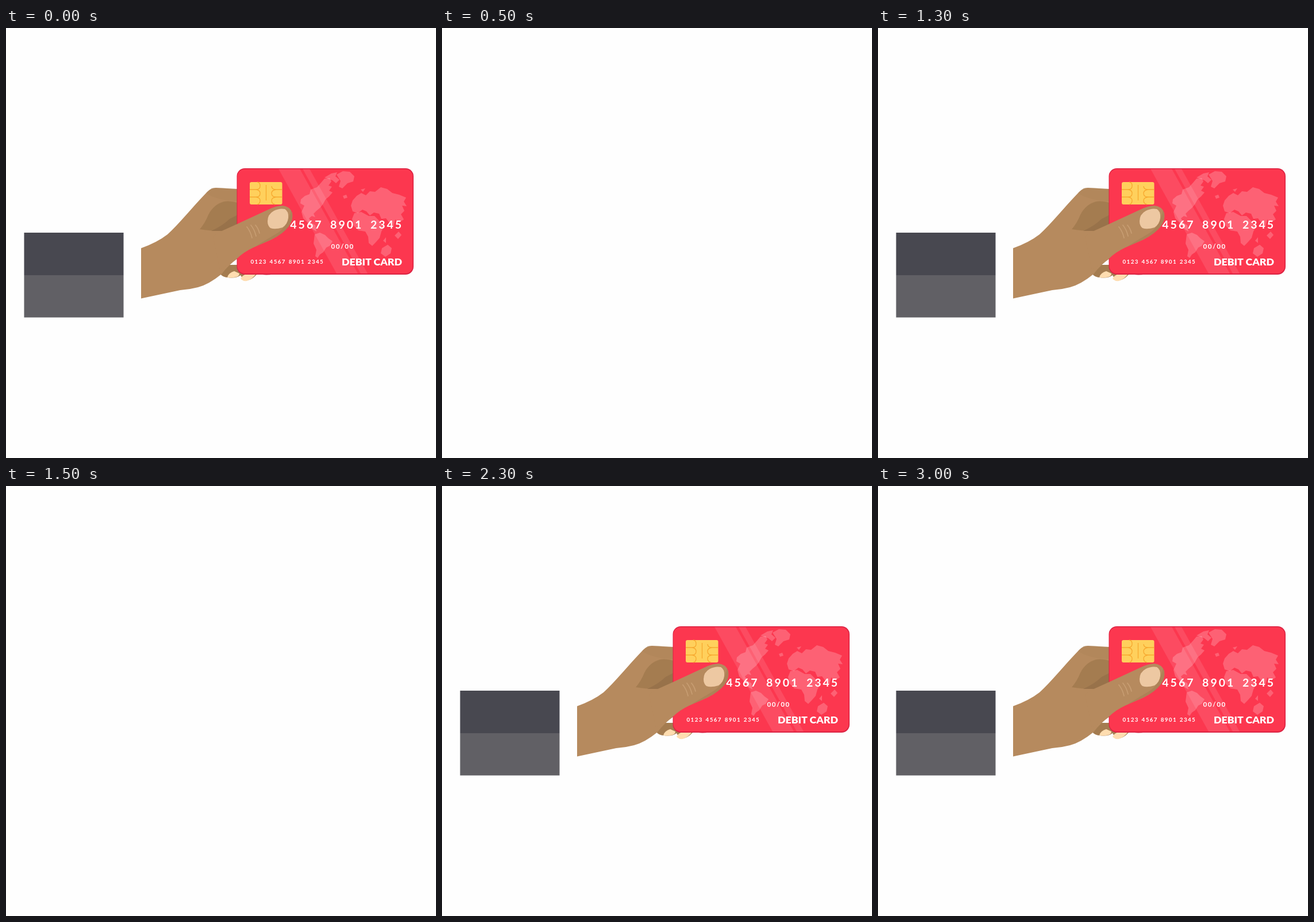
These frames come from a looping animation (748 px wide and 748 px high, 3500 ms). An HTML page:

```html
<!DOCTYPE html>
<html lang="en">
<head>
<meta charset="utf-8">
<title>Card payment</title>
<style>
  html, body { margin: 0; width: 100%; height: 100%; overflow: hidden; background: #fefefe; }
  svg { display: block; width: 100vw; height: 100vh; }
  text { font-family: Lato, sans-serif; font-weight: 700; fill: #fff; }
  .skin { fill: #b68a5e; }
  .shade { fill: #a47c50; }
  .dark { fill: #98724a; }
  .large { font-size: 19.5px; letter-spacing: 3px; }
  .small { font-size: 9.8px; letter-spacing: 1.4px; }
</style>
</head>
<body>
<svg viewBox="0 0 748 748">
  <defs>
    <clipPath id="face"><rect x="402.5" y="245.5" width="305" height="181.5" rx="13"/></clipPath>
  </defs>
  <g id="scene">
    <g id="sleeve">
      <path fill="#484850" d="M31.5 356H204.5V430H31.5z"/>
      <path fill="#616065" d="M31.5 430H204.5V503.5H31.5z"/>
    </g>

    <g id="fingers">
      <path class="shade" d="M372 427Q377 434 386 434Q400 436 408 430L414 440Q426 440 436 429L420 412H378z"/>
      <path fill="#ffddb0" d="M385 433.500Q387 426 397 423L406 427Q406 433 396 434Q389 435 385 433.500z"/>
      <path fill="#ffddb0" d="M408 436Q411 430 420 427L434 429Q428 437 419 440Q412 441 408 436z"/>
    </g>

    <g id="palm">
      <path class="skin" d="M235 383Q263 373 281 359C301 341 323 313 350 285Q357 278 365 278L403 280V401Q387 412 375 428Q353 446 334 451Q319 455 303 456L235 470.500z"/>
      <path class="shade" d="M403 281L385 279Q371 277 358 278L348 287Q366 300 403 301z" opacity=".25"/>
      <path class="shade" d="M337 350Q346 340 352 325Q361 307 379 302Q390 300 403 304V342L375 353Q354 353 337 350z"/>
      <path class="dark" d="M357 353Q377 344 389 332L403 325V341L375 353z"/>
    </g>

    <g id="card">
      <path fill="#d91f40" d="M438 426Q448 432 466 428z"/>
      <rect x="401.500" y="244" width="307.500" height="185" rx="14" fill="#dc2343"/>
      <g clip-path="url(#face)">
        <path fill="#fc374f" d="M402 245H708V427H402z"/>
        <g fill="#fff" fill-opacity=".1">
          <path d="M474 245H511L612 427H575z"/>
          <path d="M516 245H528L629 427H617z"/>
        </g>
        <g id="map" fill="#fff" fill-opacity=".21">
          <path d="M512 305L513 298L520 292L528 289L530 281L541 277L549 268L554 262L563 261L566 267L561 274L567 276L562 283L568 286L562 293L556 298L551 307L546 313L540 318L535 323L538 329L532 327L527 331L531 339L538 343L540 354L532 349L524 338L517 331L514 320L519 309z"/>
          <path d="M554 260L566 253L576 251L573 258L580 264L574 270L568 265z"/>
          <path d="M575 255L586 249L598 250L606 258L604 267L594 270L585 279L579 276L582 266z"/>
          <path d="M537 359L546 356L555 360L561 366L568 371L563 379L557 382L552 390L546 394L542 400L538 397L540 386L535 375z"/>
          <path d="M600 309L603 300L610 292L618 287L626 291L633 284L642 285L652 277L663 280L672 287L684 290L696 295L692 302L697 310L689 309L693 318L687 324L692 333L684 338L677 333L674 345L667 339L661 331L653 332L649 323L640 321L633 326L627 319L620 316L612 322L603 319z"/>
          <path d="M606 322L618 320L631 327L641 327L651 337L658 345L653 354L650 365L643 373L637 379L631 374L630 363L625 354L613 352L605 344L602 332z"/>
          <path d="M617 281L625 279L621 285zM586 292L592 290L594 295L588 297zM654 383L664 377L671 383L669 392L660 398L652 392zM676 361L683 354L688 360L682 367zM656 370L661 364L661 374z"/>
        </g>
      </g>

      <g id="chip">
        <rect x="424" y="268" width="56.500" height="39" rx="3" fill="#ffd05c"/>
        <path fill="none" stroke="#f7a92f" stroke-width="1.300" d="M424 281H435Q442 281 442 275Q442 268 437 268M424 294H435M435 281Q442 282 442 287.500Q442 294 435 294Q442 295 442 300Q442 306 437 307M480 281H470Q462 281 462 275M480 294H470M470 281Q462 282 462 287.500Q462 294 470 294Q462 295 462 300Q462 306 468 307M452.500 273V300"/>
      </g>

      <g id="labels"></g>
    </g>

    <g id="thumb">
      <path class="skin" d="M360 362Q375 353 402 341L456 316Q470 309 481 309Q494 310 498 322Q500 334 492 345Q482 358 462 368L430 382Q413 390 402 401L372 420z"/>
      <path class="dark" d="M496 317Q501 329 494 342Q485 357 461 368L434 380Q451 369 470 358Q490 347 496 317z" opacity=".35"/>
      <path fill="#edc8a2" d="M455 336Q455 324 466 318Q476 313 485 315Q492 319 491 330Q490 341 481 347Q468 351 460 348Q455 344 455 336z"/>
      <path fill="none" stroke="#c79d72" stroke-width="1.800" stroke-linecap="round" d="M419 346Q425 353 428 365M426 343Q432 350 435 362M434 343Q439 349 441 357"/>
    </g>
  </g>
</svg>
<script>
const labels = document.getElementById('labels');

function label(str, x, y, attrs) {
  const el = document.createElementNS('http://www.w3.org/2000/svg', 'text');
  for (const [k, v] of Object.entries({ x, y, ...attrs })) el.setAttribute(k, v);
  el.textContent = str;
  labels.append(el);
}

const digits = ['0123', '4567', '8901', '2345'];
digits.forEach((group, i) => {
  if (i) label(group, 424.5 + 69.8 * i, 349, { class: 'large' });
  label(group, 425.5 + 33.1 * i, 410.3, { class: 'small' });
});
label('00/00', 565.5, 384, { 'font-size': 11.6, 'letter-spacing': 1.6 });
label('DEBIT CARD', 689, 412.5, {
  'font-size': 17.8, 'text-anchor': 'end', style: 'font-weight: 900'
});

// Seven half-second steps, beginning and ending visible.
const steps = [1, 0, 1, 0, 1, 0, 1];
const frames = steps.map((opacity, i) => ({ opacity, offset: i / steps.length, easing: 'step-end' }));
frames.push({ opacity: 1, offset: 1 });
document.getElementById('scene').animate(frames, {
  duration: 500 * steps.length, iterations: Infinity
});
</script>
</body>
</html>
```
